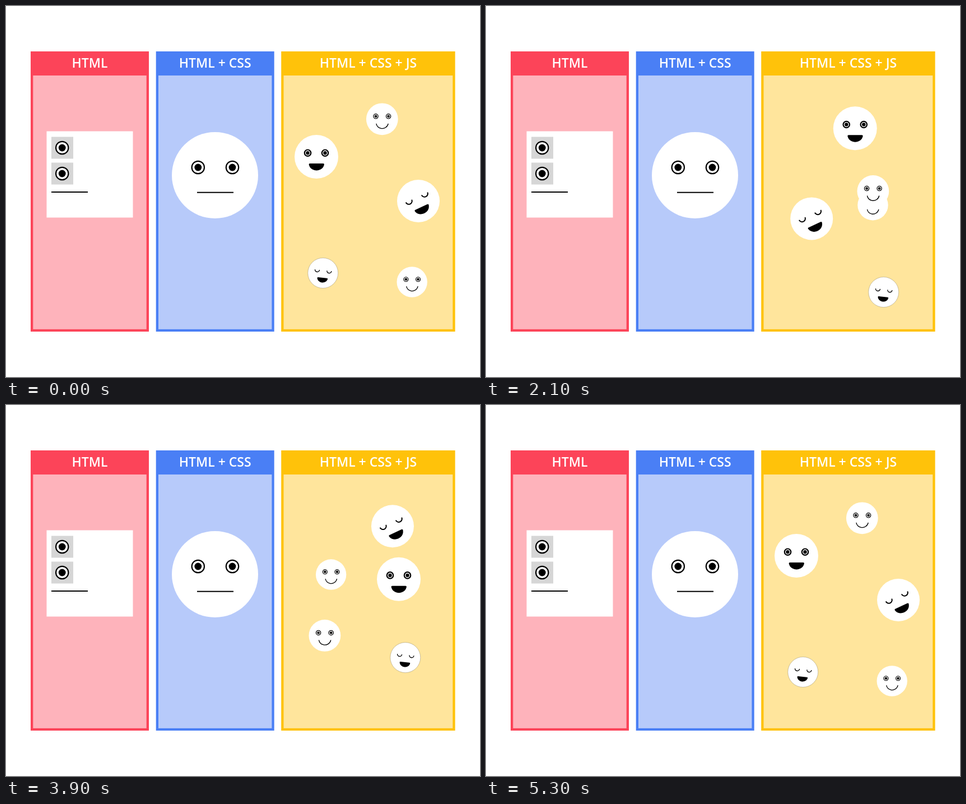
Animation of 846 by 662 pixels, one loop 5.4 s. Source, as an HTML page with a canvas:

```html
<!DOCTYPE html>
<html lang="en">
<head>
<meta charset="utf-8">
<title>HTML, CSS and JS</title>
<style>
  html, body { margin: 0; width: 100%; height: 100%; overflow: hidden; background: #fff; }
  canvas { display: block; }
</style>
</head>
<body>
<canvas id="stage" width="846" height="662"></canvas>
<script>
const ctx = document.getElementById('stage').getContext('2d');
const LOOP = 5400, STEP = 100;
const TIMES = [0, 1500, 3400, 5300];

// Painted from back to front; each path is a closed tour of three stops.
const faces = [
  { r: 39, eyes: 'open', mouth: 'laugh', path: [[554, 269], [615, 168.8], [753.5, 325.6]] },
  { r: 38, eyes: 'shut', mouth: 'laugh', scale: 1, tilt: -25, path: [[736, 348], [538.6, 476.4], [673.5, 169.2]] },
  { r: 27, eyes: 'shut', mouth: 'laugh', tilt: 6, rim: true, path: [[565.7, 476.5], [684, 542.5], [765.3, 441.4]] },
  { r: 27.2, eyes: 'open', mouth: 'smile', path: [[724.7, 492.5], [765.2, 410.8], [528.5, 234.7]] },
  { r: 28.4, eyes: 'open', mouth: 'smile', path: [[671.3, 201.8], [764, 258.6], [532.3, 486.3]] }
];

function disc(x, y, r, color) {
  ctx.fillStyle = color;
  ctx.beginPath();
  ctx.arc(x, y, r, 0, Math.PI * 2);
  ctx.fill();
}

function arc(x, y, r, from, to, width) {
  ctx.strokeStyle = '#000';
  ctx.lineWidth = width;
  ctx.beginPath();
  ctx.arc(x, y, r, from, to);
  ctx.stroke();
}

function box(x, y, w, h, color) {
  ctx.fillStyle = color;
  ctx.fillRect(x, y, w, h);
}

function eye(x, y, ring, width, pupil) {
  disc(x, y, ring, '#fff');
  arc(x, y, ring, 0, Math.PI * 2, width);
  disc(x, y, pupil, '#000');
}

function panel(x, w, title, dark, light) {
  box(x, 81, w, 500, dark);
  box(x + 4.3, 124, w - 8.6, 452.8, light);
  ctx.fillStyle = '#fff';
  ctx.font = '600 23px "Open Sans", "Noto Sans", sans-serif';
  ctx.textAlign = 'center';
  ctx.fillText(title, x + w / 2, 110);
}

function laugh() {
  ctx.fillStyle = '#000';
  ctx.beginPath();
  ctx.moveTo(-11.5, 12);
  ctx.lineTo(12, 12);
  ctx.quadraticCurveTo(14.6, 12, 13.6, 15);
  ctx.bezierCurveTo(10, 27.6, -9.5, 27.6, -13.1, 15);
  ctx.quadraticCurveTo(-14.1, 12, -11.5, 12);
  ctx.fill();
}

function drawFace(face, x, y) {
  const scale = face.scale || face.r / 39;
  disc(x, y, face.r, '#fff');
  if (face.rim) {
    ctx.strokeStyle = 'rgba(110, 100, 70, 0.6)';
    ctx.lineWidth = 0.6;
    ctx.stroke();
  }
  ctx.save();
  ctx.translate(x, y);
  ctx.rotate((face.tilt || 0) * Math.PI / 180);
  ctx.scale(scale, scale);
  for (const ex of [-15.5, 15.5]) {
    if (face.eyes === 'open') eye(ex, -6.8, 5.7, face.mouth === 'laugh' ? 2.2 : 1.7, 3.2);
    else arc(ex, -7.2, 5.8, 0, Math.PI, 2);
  }
  if (face.mouth === 'laugh') laugh();
  else arc(0.3, 8, 15, 0.2, Math.PI - 0.2, 1.8);
  ctx.restore();
}

function place(path, t) {
  const i = t < TIMES[1] ? 0 : t < TIMES[2] ? 1 : 2;
  const k = (t - TIMES[i]) / (TIMES[i + 1] - TIMES[i]);
  const from = path[i], to = path[(i + 1) % 3];
  return from.map((v, axis) => v + (to[axis] - v) * k);
}

function drawStill() {
  box(0, 0, 846, 662, '#fff');
  panel(44, 211, 'HTML', '#fc4459', '#feb3bb');
  panel(267.7, 211, 'HTML + CSS', '#4a7ff5', '#b7cafa');
  panel(491.2, 310.4, 'HTML + CSS + JS', '#ffc20a', '#ffe59c');

  box(72.5, 223.5, 154, 154, '#fff');
  for (const y of [253, 299]) {
    box(81, y - 19.5, 39, 39, '#d6d6d6');
    eye(100.2, y, 11.2, 2.2, 6.4);
  }
  box(81, 331, 65, 2, '#000');

  disc(373, 302, 77, '#fff');
  for (const x of [342.8, 404]) eye(x, 288, 11.2, 2.2, 6.4);
  box(341, 331.7, 65, 2, '#000');
}

function frame(now) {
  const t = Math.floor(now % LOOP / STEP) * STEP;
  drawStill();
  for (const face of faces) drawFace(face, ...place(face.path, t));
  requestAnimationFrame(frame);
}
requestAnimationFrame(frame);
</script>
</body>
</html>
```
